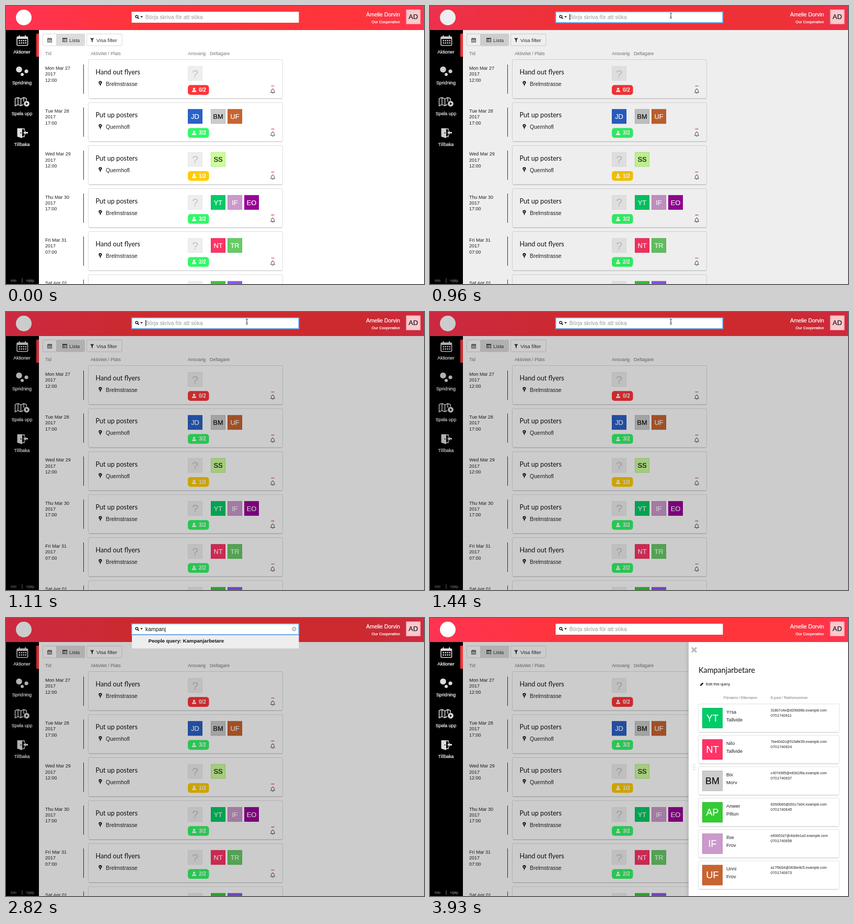
Recreate the animation shown at these times as an HTML page. Size 800 px wide and 532 px high, loop 3960 ms.

```html
<!DOCTYPE html>
<html lang="sv">
<head>
<meta charset="utf-8">
<title>Aktioner</title>
<style>
html, body { margin: 0; width: 100%; height: 100%; overflow: hidden; background: #fff; }
svg { display: block; width: 800px; height: 532px; font-family: "Liberation Sans", Arial, sans-serif; }
.title { font-family: Lato, "Open Sans", sans-serif; }
</style>
</head>
<body>
<svg id="stage" viewBox="0 0 800 532" xmlns="http://www.w3.org/2000/svg"></svg>
<script>
const LOOP = 3960, STEP = 30, PITCH = 82.3, DIM = 0.2;

const rect = (x, y, w, h, fill, more = '') =>
  `<rect x="${x}" y="${y}" width="${w}" height="${h}" fill="${fill}" ${more}/>`;
const dot = (x, y, r, fill, more = '') =>
  `<circle cx="${x}" cy="${y}" r="${r}" fill="${fill}" ${more}/>`;
const text = (x, y, size, fill, str, more = '') =>
  `<text x="${x}" y="${y}" font-size="${size}" fill="${fill}" ${more}>${str}</text>`;
const path = (d, fill, more = '') => `<path d="${d}" fill="${fill}" ${more}/>`;
const line = (d, color, width = 1, more = '') =>
  path(d, 'none', `stroke="${color}" stroke-width="${width}" ${more}`);
const group = (inner, more = '') => `<g ${more}>${inner}</g>`;
const at = (x, y, inner) => group(inner, `transform="translate(${x} ${y})"`);
const medium = c => `stroke="${c}" stroke-width=".22"`;
const middle = 'text-anchor="middle" ';

const colors = {
  JD: '#2a62c8', BM: '#cccccc', UF: '#c8642f', SS: '#ccff99', YT: '#00cc66', IF: '#cc99cc',
  EO: '#990099', NT: '#ff3366', TR: '#66cc66', AP: '#33cc33', LK: '#33cc33', OR: '#9055f5'
};

function tile(x, y, size, id) {
  const empty = id === '?';
  const ink = empty ? '#c6c6c6' : id === 'BM' || id === 'SS' ? '#111' : '#fff';
  const font = empty ? 21 : size * 0.46;
  return rect(x, y, size, size, empty ? '#eee' : colors[id]) +
    rect(x + .5, y + .5, size - 1, size - 1, 'none', `stroke="#000" stroke-opacity="${empty ? .03 : .1}"`) +
    text(x + size / 2, y + size / 2 + font * .36, font, ink, id, middle + medium(ink));
}

function figure(x, y, color) {
  return at(x, y, dot(0, -2, 2.2, color) + path('M-4 4V3Q-4 .8-2 .3Q0 1.6 2 .3Q4 .8 4 3V4Z', color));
}

const calendar = (x, y, color) => at(x, y,
  rect(-4, -3, 8, 7, 'none', `stroke="${color}"`) + rect(-4, -3, 8, 2, color) +
  line('M-2-5V-2M2-5V-2M-4 1.5H4M-1.3-1V4M1.3-1V4', color, .8));

const pill = { red: '#ff3539', green: '#33f768', yellow: '#ffcc00' };

function card(i, [day, hour, title, place, count, tone, lead, team]) {
  const pin = path('M0 5C-1-1-3.2-.5-3.2-2.6A3.2 3 0 0 1 3.2-2.6C3.2-.5 1-1 0 5Z', '#222') + dot(0, -2.3, 1.1, '#fff');
  const bell = line('M-4 2.8H4Q2.6 1.6 2.6-.8Q2.6-3.8 0-3.8T-2.6-.8Q-2.6 1.6-4 2.8ZM-1 4.2H1M0-5V-4', '#333', .9);
  const dots = [-2, 0, 2].map(x => dot(x, -9.7, .9, '#e8333c')).join('');
  return at(0, i * PITCH,
    [day, '2017', hour].map((s, k) => text(75, 121.7 + k * 11.4, 9, '#222', s)).join('') +
    rect(148, 112, 1, 56, '#333') +
    rect(157.5, 102.5, 372, 74.5, '#fff', 'rx="2.5" stroke="#dcdcdc"') +
    line('M159 177.5H528.5', '#c6c6c6') +
    text(171.5, 131.2, 12.6, '#111', title, 'class="title"') +
    at(180.5, 149.2, pin) + text(191, 153, 10.4, '#222', place) +
    tile(348, 115, 28, lead) +
    team.map((id, k) => tile(392 + 32 * k, 115, 28, id)).join('') +
    rect(348, 151.3, 40.5, 18.6, pill[tone], 'rx="5"') + figure(360, 160.6, '#fff') +
    text(369, 164.2, 10, '#fff', count, 'font-weight="bold"') +
    at(510.5, 162.8, bell + dots));
}

const FLYERS = 'Hand out flyers', POSTERS = 'Put up posters';
const STREET = 'Brelmstrasse', SQUARE = 'Quernhofl';
const shifts = [
  ['Mon Mar 27', '12:00', FLYERS, STREET, '0/2', 'red', '?', []],
  ['Tue Mar 28', '17:00', POSTERS, SQUARE, '3/2', 'green', 'JD', ['BM', 'UF']],
  ['Wed Mar 29', '12:00', POSTERS, SQUARE, '1/2', 'yellow', '?', ['SS']],
  ['Thu Mar 30', '17:00', POSTERS, STREET, '3/2', 'green', '?', ['YT', 'IF', 'EO']],
  ['Fri Mar 31', '07:00', FLYERS, STREET, '2/2', 'green', '?', ['NT', 'TR']],
  ['Sat Apr 01', '12:00', FLYERS, STREET, '2/2', 'green', '?', ['LK', 'OR']]
];

function list() {
  const button = (x, w, fill) => rect(x + .5, 53.5, w, 22.5, fill, 'rx="1.5" stroke="#d8d8d8"');
  const heads = [[75, 'Tid'], [162, 'Aktivitet / Plats'], [348, 'Ansvarig'], [390, 'Deltagare']];
  const table = at(112.5, 65, rect(-4, -3.5, 8, 7, 'none', 'stroke="#444"') + rect(-4, -3.5, 8, 2, '#444') +
    line('M-4 1H4M-1.5-2V3.5', '#444', .8));
  return rect(63, 46, 737, 486, '#fff') +
    button(70, 26, '#fff') + button(96, 54, '#dcdcdc') + button(154, 67.5, '#fff') +
    calendar(83.5, 65.3, '#555') + table + text(121, 68.7, 9.5, '#333', 'Lista') +
    path('M161 61.5H168.5L165.8 65V69.5L163.8 68V65Z', '#333') + text(173, 68.7, 9.7, '#333', 'Visa filter') +
    heads.map(([x, s]) => text(x, 94, 8.8, '#777', s)).join('') +
    shifts.map((s, i) => card(i, s)).join('');
}

function sidebar() {
  const label = (y, s) => text(30.5, y, 8.8, '#fff', s, middle + medium('#fff'));
  const month = rect(21, 59, 20.5, 16.5, 'none', 'rx="1.5" stroke="#ddd" stroke-width="1.6"') +
    rect(21, 59, 20.5, 4, '#ddd') + line('M25.5 56V61M37 56V61', '#ddd', 2) +
    [66.3, 70.8].map(y => line(`M24.5 ${y}H39`, '#ddd', 2.4, 'stroke-dasharray="2.4 1.6"')).join('');
  const map = line('M17.5 177L23 175L28.5 178L34 175L39 177V181M17.5 177V191L23 188.5L28.5 191L33 188.5M23 175V188.5M28.5 178V191M34 175V183', '#ddd', 1.5) +
    dot(39.5, 187, 5.4, '#ddd') + path('M38 184.2L42.2 187L38 189.8Z', '#000');
  const door = path('M21.5 234H31V253L21.5 250Z', '#ddd') + line('M31 235H35V239M35 246V250H31', '#ddd', 1.4) +
    path('M33 242.5L37.5 238.5V241H42V244H37.5V246.5Z', '#ddd') + dot(28.5, 243, 1, '#000');
  return rect(0, 46, 63, 486, '#000') + rect(58, 53, 5, 44, '#ff3339') + month +
    dot(25, 121.5, 5.8, '#ddd') + dot(39, 125, 3.6, '#ddd') + dot(31, 131, 3, '#ddd') + map + door +
    label(91, 'Aktioner') + label(150, 'Spridning') + label(208.5, 'Spela upp') + label(267.5, 'Tillbaka') +
    text(9, 528, 6.5, '#999', 'Info') + rect(30.5, 521, 1, 9, '#777') + text(39, 528, 6.5, '#999', 'Hjälp');
}

const members = [
  ['YT', 'Yrsa', 'Tallvide', '318b7c4e@d20fa96b', '0701740611'],
  ['NT', 'Nilo', 'Tallvide', '7be40d2c@51fa8e39', '0701740624'],
  ['BM', 'Bix', 'Morv', 'c407e985@e83d1f6a', '0701740637'],
  ['AP', 'Anwer', 'Piltun', '82fd3b60@b91c7a04', '0701740645'],
  ['IF', 'Ilse', 'Frov', 'e60b52d7@4dc8e1a3', '0701740658'],
  ['UF', 'Unni', 'Frov', 'a17f9d34@063be8c5', '0701740673']
];

function memberRow([id, first, last, mail, phone], i) {
  return at(0, i * 60.1,
    rect(513.5, 164.5, 270, 54, '#fff', 'rx="2" stroke="#e2e2e2"') + line('M515 219H782', '#cfcfcf') +
    tile(521, 172, 39, id) +
    text(567, 182.7, 9.4, '#222', first) + text(567, 197.6, 9.4, '#222', last) +
    text(652, 179, 6.8, '#222', mail + '.example.com') + text(652, 189, 7.3, '#222', phone));
}

function panel() {
  const grip = [280.5, 285, 289.5].map(y => dot(503.7, y, 1.1, '#d5d5d5') + dot(506.7, y, 1.1, '#d5d5d5')).join('');
  return rect(487, 46, 8, 486, 'url(#shade)') + rect(495, 46, 306, 486, '#fff') +
    line('M501 56.5L510 65.5M510 56.5L501 65.5', '#bcbcbc', 3.2) + grip +
    text(514, 105.2, 14.4, '#111', 'Kampanjarbetare', 'class="title"') +
    path('M516.8 130L517.4 127.6L521.6 123.4L523.4 125.2L519.2 129.4Z', '#111') +
    text(528, 129.2, 7.3, '#111', 'Edit this query') +
    text(562, 155, 6.8, '#777', 'Förnamn / Efternamn') + text(652, 155, 6.7, '#777', 'E-post / Telefonnummer') +
    group(members.map(memberRow).join(''), 'id="rows"');
}

function header() {
  return rect(0, 0, 800, 46, 'url(#red)') + dot(34, 22, 15, '#fff');
}

function account() {
  return text(754, 20, 10.4, '#fff', 'Amelie Dorvin', 'text-anchor="end" ' + medium('#fff')) +
    text(754, 33, 7.4, '#fff', 'Our Cooperative', 'text-anchor="end" ' + medium('#fff')) +
    rect(766, 7, 27, 27.5, '#fbc9cd', 'stroke="#ff8f9a"') +
    text(779.5, 24.8, 12.8, '#111', 'AD', middle + medium('#111'));
}

function search() {
  const clear = dot(551.5, 21, 4.4, '#bbb') + line('M549.8 19.3L553.2 22.7M553.2 19.3L549.8 22.7', '#fff', 1.1);
  return group(rect(241, 31, 319.5, 27.3, '#eee') +
      text(272.5, 46.7, 9.6, '#111', 'People query: Kampanjarbetare', 'font-weight="bold"'), 'id="hint"') +
    rect(240.5, 11, 320, 21, '#fff') +
    rect(240.5, 11, 320, 21, 'none', 'id="focus" stroke="#5b9fe6" stroke-width="1.8"') +
    dot(250.3, 20.2, 2.3, 'none', 'stroke="#111" stroke-width="1.4"') + line('M252 22L254.4 24.4', '#111', 1.7) +
    path('M257 19.5H262L259.5 22.3Z', '#111') +
    text(266.8, 24.8, 10.5, '#999', 'Börja skriva för att söka', 'id="prompt"') +
    text(266.8, 24.8, 10.4, '#111', '', 'id="typed"') +
    rect(0, 15, 1, 12, '#111', 'id="caret"') + group(clear, 'id="clear"') +
    group(line('M-2-5Q0-5 0-3.5Q0-5 2-5M0-4V4M-2 5Q0 5 0 3.5Q0 5 2 5M-1 1.5H1', '#222', .9), 'id="beam"');
}

const stage = document.getElementById('stage');
stage.innerHTML = `<defs>
  <linearGradient id="red"><stop offset="0" stop-color="#ff3352"/><stop offset=".3" stop-color="#ff343c"/>
    <stop offset=".85" stop-color="#ff353b"/><stop offset="1" stop-color="#ff3450"/></linearGradient>
  <linearGradient id="shade"><stop offset="0" stop-opacity="0"/><stop offset="1" stop-opacity=".08"/></linearGradient>
  </defs>` +
  list() + rect(63, 46, 737, 486, '#000', 'id="dimList"') +
  group(panel(), 'id="panel"') + header() + sidebar() +
  path('M0 0H800V46H63V532H0Z', '#000', 'id="dimFrame"') + account() + search();

const el = {};
stage.querySelectorAll('[id]').forEach(n => el[n.id] = n);

const WORD = 'kampanj';
const T = { beam: 780, focus: 880, dim: 915, dimmed: 1050, type: 1590, key: 110, hint: 2430, open: 2910, opened: 3180, rows: 3480 };
const ramp = (t, a, b) => Math.min(1, Math.max(0, (t - a) / (b - a)));
const easeOut = p => 1 - (1 - p) ** 3;
const show = (node, on) => node.setAttribute('visibility', on ? 'visible' : 'hidden');

function draw(t) {
  const focused = t >= T.focus && t < T.open;
  const keys = focused ? Math.min(WORD.length, Math.max(0, Math.floor((t - T.type) / T.key) + 1)) : 0;
  const lastKey = keys ? T.type + (keys - 1) * T.key : T.focus;
  const dim = DIM * ramp(t, T.dim, T.dimmed);

  el.dimList.setAttribute('opacity', dim);
  el.dimFrame.setAttribute('opacity', dim * (1 - ramp(t, T.open, T.open + 180)));

  el.typed.textContent = WORD.slice(0, keys);
  show(el.prompt, !keys);
  show(el.clear, keys);
  show(el.focus, focused);
  show(el.hint, focused && t >= T.hint);
  show(el.caret, focused && (t - lastKey) % 1000 < 500);
  el.caret.setAttribute('x', 267 + (keys ? el.typed.getComputedTextLength() : 0));

  show(el.beam, t >= T.beam && t < T.type);
  const rise = 1 - easeOut(ramp(t, T.beam, T.focus));
  el.beam.setAttribute('transform', `translate(${461 + 5 * rise} ${18.5 + 9 * rise})`);

  const slide = 313 * (1 - easeOut(ramp(t, T.open, T.opened)));
  el.panel.setAttribute('transform', `translate(${slide} 0)`);
  show(el.panel, t >= T.open);
  show(el.rows, t >= T.rows);
}

const start = performance.now();
function tick() {
  const t = (performance.now() - start) % LOOP;
  draw(Math.floor(t / STEP) * STEP);
  requestAnimationFrame(tick);
}
tick();
</script>
</body>
</html>
```
